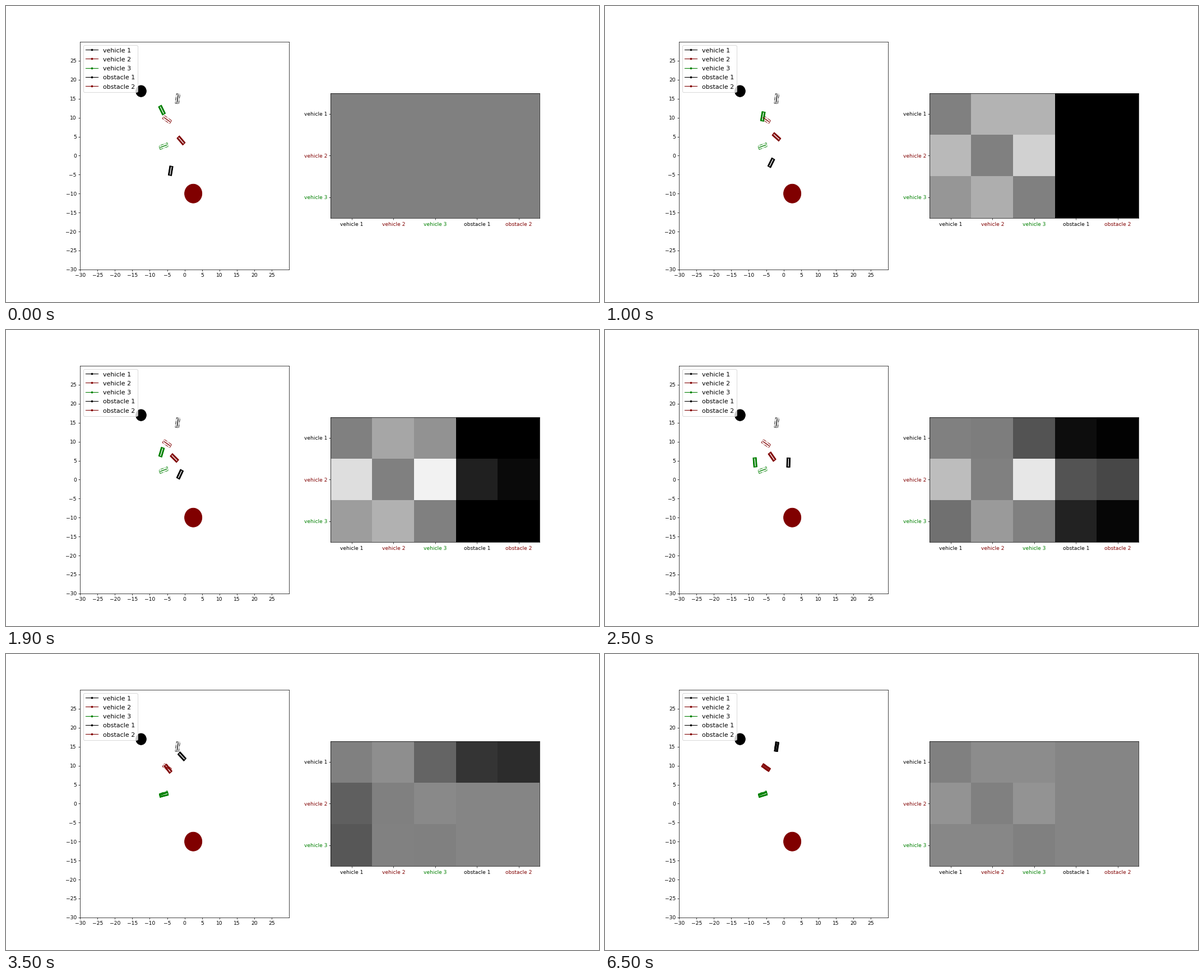
Recreate the animation shown at these times as a matplotlib script. Size 1058 px wide and 529 px high, loop 7200 ms.

```python
import numpy as np
import matplotlib.pyplot as plt
from matplotlib.animation import FuncAnimation
from matplotlib.patches import Circle, Rectangle

STEP_MS, LOOP_MS = 100, 7200
LENGTH, WIDTH = 2.5, 1.0
NEUTRAL = 128
COLORS = ["black", "maroon", "green"]
LABELS = ["vehicle 1", "vehicle 2", "vehicle 3", "obstacle 1", "obstacle 2"]

# Key poses per vehicle: time in ms, x, y, heading in degrees.
ROUTES = [
    [(0, -4, -4, 80), (1500, -3.05, -0.15, 55), (2500, 1.4, 4.5, 88),
     (3500, -0.75, 12.45, 135), (4800, -1.9, 16.1, 82), (6500, -2, 15, 81)],
    [(0, -1, 4, 133), (1500, -2.65, 5.5, 143), (2500, -3.3, 6.05, 127),
     (3500, -4.75, 9.2, 130), (4600, -5.05, 9.5, 147)],
    [(0, -6.5, 12, -62), (1500, -5.75, 8.9, -114), (2500, -8.2, 4.55, -85),
     (3500, -5.95, 2.4, 13), (4600, -5.95, 2.4, 16)],
]
GOALS = [(-2, 15, 81), (-5.05, 9.5, 147), (-6, 2.5, 19)]

# Mean attention of each vehicle to the others, and when it notices obstacles.
LEVEL_TIMES = [400, 1500, 2500, 3500, 4600, 5600]
LEVELS = [[168, 190, 104, 121, 88, 140],
          [138, 246, 210, 116, 132, 148],
          [129, 189, 133, 108, 130, 135]]
NOTICE = [(2150, 5600), (1500, 3100), (2150, 3500)]


def glide(keys, t):
    """Monotone cubic through rows of (time, values...), resting at both ends."""
    keys = np.array(keys, float)
    times, values = keys[:, 0], keys[:, 1:]
    t = np.clip(t, times[0], times[-1])
    rates = np.diff(values, axis=0) / np.diff(times)[:, None]
    before, after = rates[:-1], rates[1:]
    product = before * after
    slopes = np.zeros_like(values)
    np.divide(2 * product, before + after, out=slopes[1:-1], where=product > 0)
    i = min(np.searchsorted(times, t, side="right") - 1, len(times) - 2)
    h = times[i + 1] - times[i]
    u = (t - times[i]) / h
    ease = u * u * (3 - 2 * u)
    return (values[i] * (1 - ease) + values[i + 1] * ease
            + h * u * (1 - u) * ((1 - u) * slopes[i] - u * slopes[i + 1]))


def attention(t):
    grid = np.full((3, 5), float(NEUTRAL))
    if t == 0:
        return grid
    lean = 24 * abs(np.cos(np.pi * min(t, 4500) / 3000))
    for row in range(3):
        first, second = [c for c in range(3) if c != row]
        level = np.interp(t, LEVEL_TIMES, LEVELS[row])
        tilt = lean if row == 0 and t > 1500 else -lean if row else 0
        grid[row, first], grid[row, second] = level + tilt, level - tilt
        start, end = NOTICE[row]
        fade = 60 * (1 - t / 800) / (row + 1) ** 2
        for k in range(2):
            seen = np.interp(t, [start + 300 * k, end], [0, NEUTRAL + 5])
            grid[row, 3 + k] = max(seen, fade)
    return grid


class Car:
    """A filled body with a white axis, or a dash-dotted goal with a coloured one."""

    def __init__(self, ax, color, pose, goal=False):
        self.body = ax.add_patch(Rectangle(
            (0, 0), LENGTH, WIDTH, rotation_point="center", fill=not goal,
            fc=color, ec=color, lw=1, ls="dashdot" if goal else "solid",
            zorder=2 if goal else 3))
        self.axis, = ax.plot([], [], color=color if goal else "white",
                             lw=1.5, zorder=2 if goal else 4)
        self.place(*pose)

    def place(self, x, y, angle):
        self.body.set_xy((x - LENGTH / 2, y - WIDTH / 2))
        self.body.set_angle(angle)
        reach = 0.38 * LENGTH * np.array([-1, 1])
        a = np.radians(angle)
        self.axis.set_data(x + reach * np.cos(a), y + reach * np.sin(a))


fig, (road, grid) = plt.subplots(1, 2, figsize=(16, 8), dpi=66.125)
fig.subplots_adjust(top=0.879)

road.set(xlim=(-30, 30), ylim=(-30, 30),
         xticks=np.arange(-30, 30, 5), yticks=np.arange(-30, 30, 5))
for label, color in zip(LABELS, COLORS + COLORS[:2]):
    road.plot([], [], ".-", color=color, lw=1.2, label=label)
road.legend(loc="upper left", fontsize=12, handleheight=1.0)
road.add_patch(Circle((-12.5, 17), 1.5, color="black"))
road.add_patch(Circle((2.5, -10), 2.5, color="maroon"))
goals = [Car(road, c, pose, goal=True) for c, pose in zip(COLORS, GOALS)]
cars = [Car(road, c, route[0][1:]) for c, route in zip(COLORS, ROUTES)]
for goal in goals:
    goal.axis.set_zorder(5)

image = grid.imshow(attention(0), cmap="gray", vmin=0, vmax=255)
grid.set_xticks(range(5), LABELS)
grid.set_yticks(range(3), LABELS[:3])
for ticks in (grid.get_xticklabels(), grid.get_yticklabels()):
    for tick, color in zip(ticks, COLORS + COLORS[:2]):
        tick.set_color(color)


def update(frame):
    t = frame * STEP_MS
    for car, route in zip(cars, ROUTES):
        car.place(*glide(route, t))
    image.set_data(attention(t))
    return [image]


anim = FuncAnimation(fig, update, frames=LOOP_MS // STEP_MS,
                     interval=STEP_MS, repeat=True)
plt.show()
```
